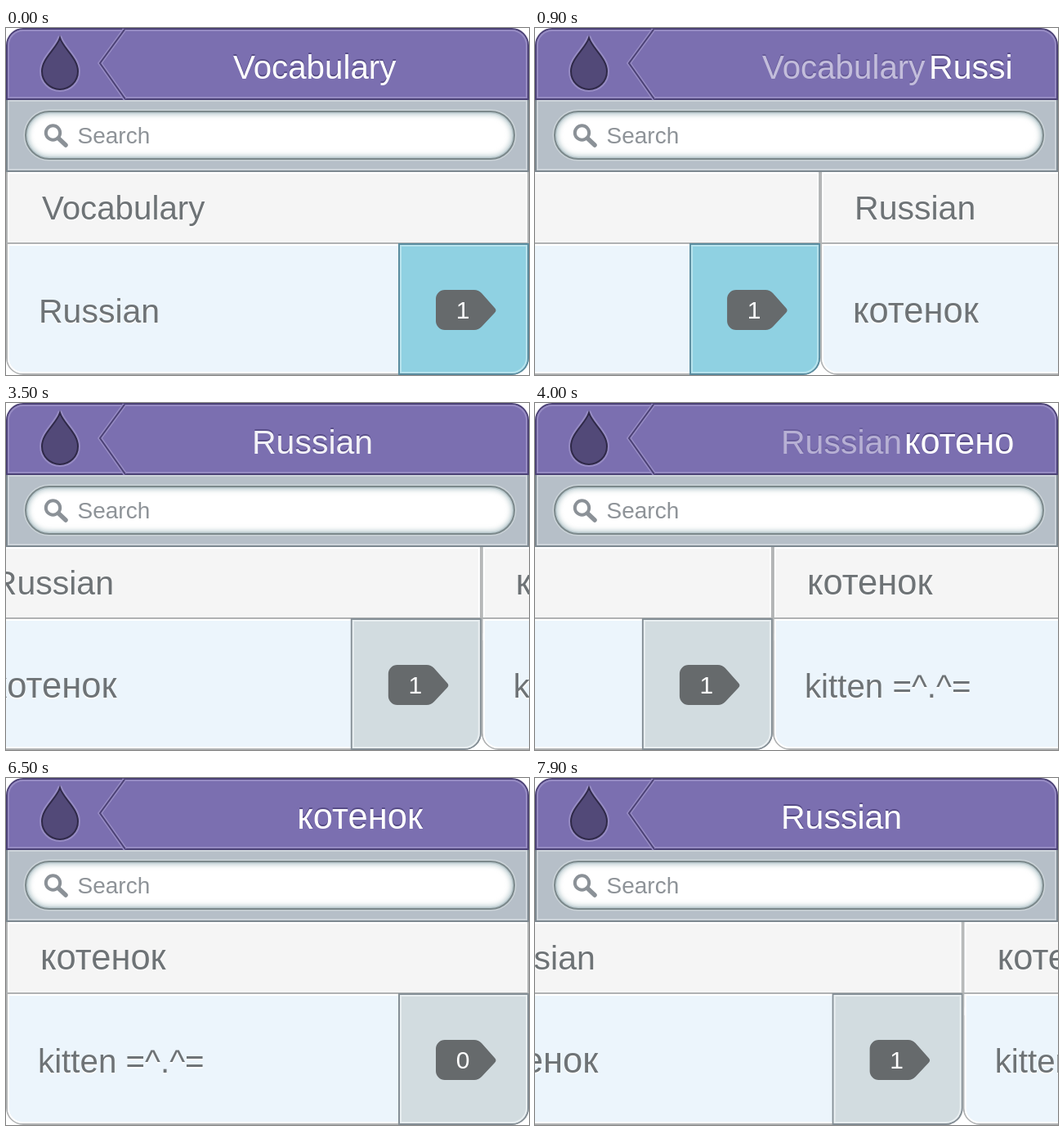
Animation, 640 px wide and 424 px high, one loop 8 s. Source, as an HTML page:

```html
<!DOCTYPE html>
<html lang="en">
<head>
<meta charset="utf-8">
<title>Vocabulary browser</title>
<style>
  html, body { margin: 0; width: 100%; height: 100%; overflow: hidden; background: #fff; }
  svg { display: block; width: 640px; height: 424px; }
  text { font-family: "Liberation Sans", Arial, sans-serif; white-space: pre; }
</style>
</head>
<body>
<svg id="stage" viewBox="0 0 640 424"></svg>
<script>
const WIDTH = 640, LOOP = 8000, STEP = 100;
const TITLE_TRAVEL = 332;

const CYAN = { border: '#5a8c9f', light: '#b7e3ed', fill: '#8fd1e2' };
const GREY = { border: '#858f96', light: '#e8eef0', fill: '#d2dce0' };

const isCyrillic = s => /[а-я]/.test(s);
const fontSize = s => isCyrillic(s) ? 43.5 : s === 'Russian' ? 41 : 40.3;

// Text with a one-colour relief behind it.
function label(s, x, y, fill, relief, dy) {
  const draw = (top, color) =>
    `<text x="${x}" y="${top}" font-size="${fontSize(s)}" fill="${color}">${s}</text>`;
  return draw(y + dy, relief) + draw(y, fill);
}

const bodyText = (s, x, y) => label(s, x, y, '#6e7376', '#fff', 2);
const titleText = (id, s, x) => `<g id="${id}">${label(s, x, 62, '#fff', '#574c87', -2)}</g>`;

function page(index, heading, headingX, item, itemX, count, tone) {
  return `<g transform="translate(${index * WIDTH})" stroke-width="2">
    <rect x="1" y="150" width="638" height="273" rx="20" fill="#ecf5fc" stroke="#b0b2b3"/>
    <rect x="3" y="265" width="634" height="156" rx="17" fill="none" stroke="#fff"/>
    <path d="M2 264H638V290H2z" fill="#ecf5fc"/>
    <path d="M3 290V265H637V290" fill="none" stroke="#fff"/>
    <rect x="3" y="177" width="634" height="86" fill="#f5f5f5" stroke="#fff"/>
    <path d="M0 263H640" stroke="#b0b2b3"/>
    <path d="M481 264H639V403a20 20 0 0 1-20 20H481z" fill="${tone.fill}" stroke="${tone.border}"/>
    <path d="M483 266H637V403a18 18 0 0 1-18 18H483z" fill="none" stroke="${tone.light}"/>
    <path d="M537 320H573Q578 320 582 324L598 342Q601 345 598 348L582 365Q578 369 573 369H537
      a11 11 0 0 1-11-11V331a11 11 0 0 1 11-11z" fill="#666a6c"/>
    <text x="559" y="354.5" font-size="30" text-anchor="middle" fill="#fff">${count}</text>
    ${bodyText(heading, headingX, 234)}
    ${bodyText(item, itemX, 360)}
  </g>`;
}

const chevron = 'M145 2L115 43L146 87';
const drop = 'M66 12C62 25 44 37 44 53a22 22 0 0 0 44 0C88 37 70 25 66 12z';
const field = 'x="24" y="102" width="598" height="58" rx="29"';

document.getElementById('stage').innerHTML = `
  <defs>
    <clipPath id="bodyClip"><path d="M0 176H640V424H0z"/></clipPath>
    <clipPath id="titleClip"><path d="M150 4H585V84H150z"/></clipPath>
    <clipPath id="fieldClip"><rect ${field}/></clipPath>
    <filter id="soft"><feGaussianBlur stdDeviation="3"/></filter>
  </defs>

  <g clip-path="url(#bodyClip)"><g id="pages">
    ${page(0, 'Vocabulary', 44, 'Russian', 40, 1, CYAN)}
    ${page(1, 'Russian', 42, 'котенок', 40, 1, GREY)}
    ${page(2, 'котенок', 42, 'kitten =^.^=', 39, 0, GREY)}
  </g></g>

  <g stroke-width="2">
    <rect x="1" y="86" width="638" height="89" fill="#b6bfc8" stroke="#7d8890"/>
    <rect x="3" y="89" width="634" height="84" fill="none" stroke="#cdd4da"/>
    <rect ${field} fill="#fff" stroke="#cbd3d8" stroke-width="5"/>
    <g clip-path="url(#fieldClip)">
      <rect ${field} fill="none" stroke="#b4c6ca" stroke-width="7" filter="url(#soft)"/>
    </g>
    <rect ${field} fill="none" stroke="#7c898c"/>
  </g>
  <g fill="none" stroke="#8b9197">
    <circle cx="57.5" cy="128" r="8.7" stroke-width="4"/>
    <path d="M64.5 135L73 143" stroke-width="5.5" stroke-linecap="round"/>
  </g>
  <text x="87.5" y="141" font-size="28" fill="#8e9398">Search</text>

  <g stroke-width="2">
    <path d="M1 87V21A20 20 0 0 1 21 1H619A20 20 0 0 1 639 21V87z" fill="#7b6fb0" stroke="#4b4175"/>
    <path d="M3 85V21A18 18 0 0 1 21 3H619A18 18 0 0 1 637 21V85z" fill="none" stroke="#968bc3"/>
    <path d="${chevron}" fill="none" stroke="#968bc3" stroke-width="5"/>
    <path d="${chevron}" fill="none" stroke="#4b4175"/>
    <path d="${drop}" fill="none" stroke="#968bc3" stroke-width="6" stroke-linejoin="round"/>
    <path d="${drop}" fill="#524978" stroke="#2f2948"/>
  </g>
  <g clip-path="url(#titleClip)">
    ${titleText('vocabulary', 'Vocabulary', 278)}
    ${titleText('russian', 'Russian', 301)}
    ${titleText('kitten', 'котенок', 301)}
  </g>`;

const byId = id => document.getElementById(id);
const pages = byId('pages');
const titles = ['vocabulary', 'russian', 'kitten'].map(byId);

function place(node, x, opacity = 1) {
  node.setAttribute('transform', `translate(${x})`);
  node.setAttribute('opacity', opacity);
}

function render(t) {
  // Linear progress in whole steps; the first step lands at the start time.
  const ramp = (start, steps) =>
    Math.min(1, Math.max(0, (Math.floor((t - start) / STEP) + 1) / steps));

  const toRussian = ramp(500, 11);
  const toKitten = ramp(3500, 11);
  const titleOut = ramp(6500, 6);
  const back = ramp(7100, 11);

  place(pages, -WIDTH * (toRussian + toKitten - back));
  place(titles[0], 0, 1 - toRussian);
  place(titles[1], TITLE_TRAVEL * (1 - toRussian), titleOut === 1 ? 1 : 1 - toKitten);
  place(titles[2], TITLE_TRAVEL * (1 - toKitten + titleOut));
}

const begin = performance.now();
function tick() {
  render((performance.now() - begin) % LOOP);
  requestAnimationFrame(tick);
}
tick();
</script>
</body>
</html>
```
